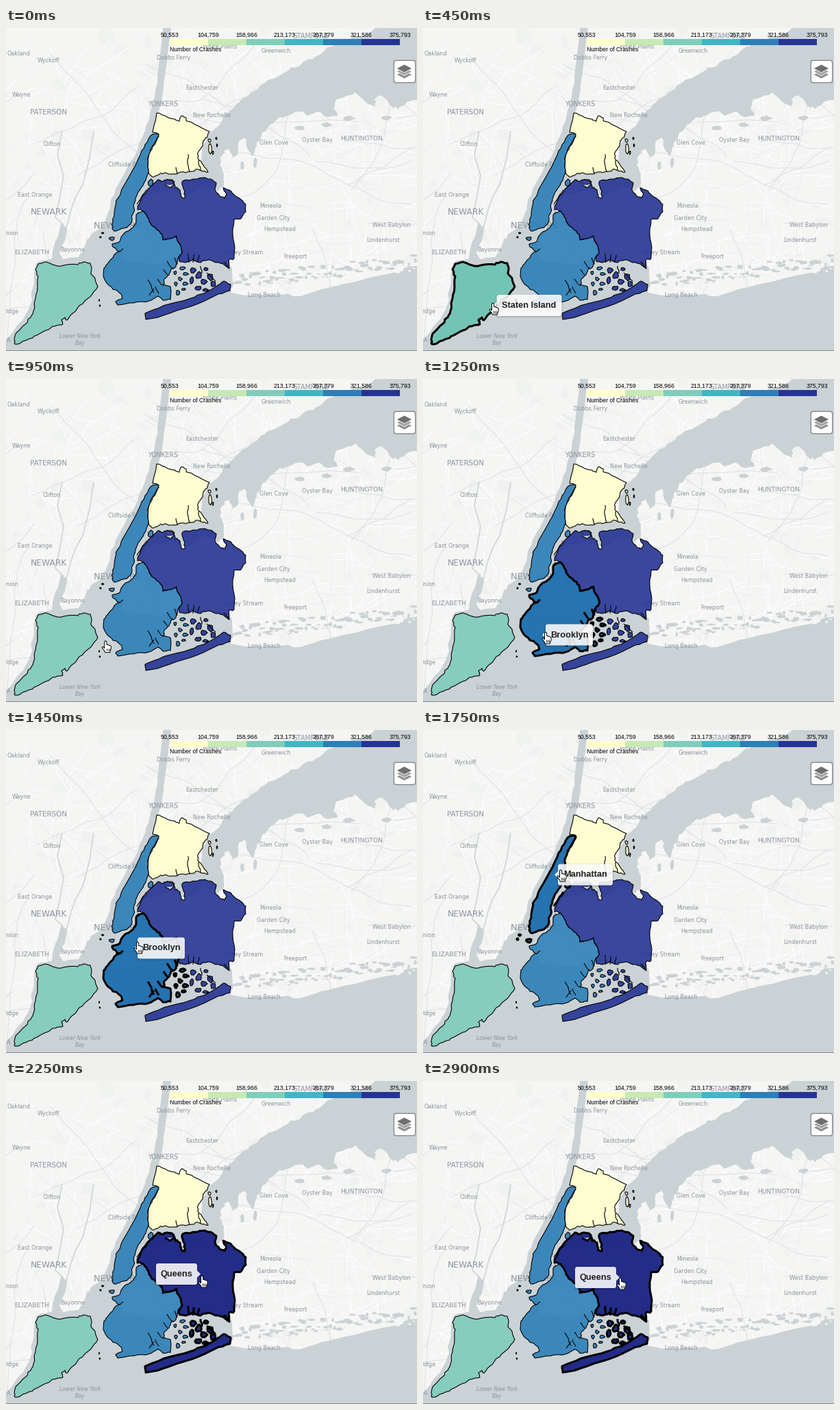
Animation of 600x471 px, one loop 2950 ms. Source, as a matplotlib script:

```python
import numpy as np
import matplotlib.pyplot as plt
from matplotlib.animation import FuncAnimation
from matplotlib.collections import LineCollection
from matplotlib.colors import to_rgba
from matplotlib.patches import FancyBboxPatch, PathPatch, Polygon, Rectangle
from matplotlib.path import Path
from matplotlib.transforms import Affine2D

W, H, DPI = 600, 471, 64
PT = 72 / DPI  # points per pixel
STEP, FRAMES = 50, 59
LAND, WATER, LABEL = "#f5f5f4", "#cbd2d5", "#8b959f"
rng = np.random.default_rng(11)

fig = plt.figure(figsize=(W / DPI, H / DPI), dpi=DPI, facecolor=LAND)
ax = fig.add_axes([0, 0, 1, 1])
ax.set(xlim=(0, W), ylim=(H, 0))
ax.axis("off")


def rough(pts, amp=0.6, n=3, closed=True):
    """Subdivide a polyline and shake the new points a little."""
    pts = np.array(pts, float)
    ends = np.roll(pts, -1, axis=0)
    if not closed:
        pts, ends = pts[:-1], ends[:-1]
    out = []
    for a, b in zip(pts, ends):
        out.append(a)
        for k in range(1, n):
            out.append(a + (b - a) * k / n + rng.normal(0, amp, 2))
    out.append(out[0] if closed else ends[-1])
    return Path(out, closed=closed)


def blob(x, y, rx, ry):
    a = np.linspace(0, 2 * np.pi, 9, endpoint=False)
    r = rng.uniform(0.7, 1.2, 9)
    return rough(np.c_[x + rx * r * np.cos(a), y + ry * r * np.sin(a)], 0.2, 2)


def text(x, y, s, px, color=LABEL, font="DejaVu Sans", **kw):
    kw = {"ha": "center", "va": "center", "zorder": 4, **kw}
    return ax.text(x, y, s, fontsize=px * PT, color=color, family=font, **kw)


def rounded(x, y, w, h, r=3, **kw):
    style = f"round,pad=0,rounding_size={r}"
    return ax.add_patch(FancyBboxPatch((x, y), w, h, boxstyle=style, **kw))


# --- base map: roads first, water on top of them ---
def road(x, y, angle, length):
    n = int(length / 8)
    turn = angle + np.cumsum(rng.normal(0, 0.12, n))
    return np.c_[x + 8 * np.cumsum(np.cos(turn)), y + 8 * np.cumsum(np.sin(turn))]


def roads(count, color, lw, lo, hi):
    segs = []
    for _ in range(count):
        x, y = rng.uniform(0, W), rng.uniform(0, 400)
        if x > 310 and y > 120:
            angle = rng.choice([0.0, -0.12, 1.5])
        else:
            angle = rng.choice([1.9, 1.2, 0.5, 2.5])
        segs.append(road(x, y, angle, rng.uniform(lo, hi)))
    ax.add_collection(LineCollection(segs, colors=color, linewidths=lw * PT, zorder=1))


for _ in range(45):
    park = blob(rng.uniform(0, W), rng.uniform(0, 380), *rng.uniform(4, 15, 2))
    ax.add_patch(PathPatch(park, fc="#f0f2f0", lw=0, zorder=1))
roads(260, "#ffffff", 1.0, 30, 110)
roads(130, "#ebecec", 0.7, 30, 120)
roads(26, "#e2e4e5", 1.3, 120, 320)

HARBOR = [
    (229, -2), (226, 30), (221, 70), (217, 100), (210, 125), (203, 150),
    (192, 178), (175, 208), (160, 235), (152, 258), (147, 275), (138, 290),
    (128, 298), (118, 308), (114, 322), (106, 334), (85, 337), (60, 338),
    (46, 341), (41, 355), (39, 380), (35, 405), (25, 425), (12, 440),
    (4, 450), (-2, 455), (-2, 475), (602, 475), (602, 346), (560, 358),
    (510, 370), (460, 381), (430, 391), (400, 389), (350, 390), (328, 386),
    (331, 372), (330, 350), (322, 340), (250, 334), (228, 345), (170, 340),
    (165, 310), (192, 285), (200, 250), (212, 225), (214, 180), (222, 155),
    (215, 152), (222, 125), (228, 100), (232, 70), (237, 30), (241, -2)]
SOUND = [
    (206, 212), (240, 208), (285, 200), (286, 172), (298, 152), (310, 143),
    (318, 128), (332, 117), (345, 103), (362, 92), (378, 80), (395, 72),
    (412, 62), (428, 56), (440, 46), (456, 40), (470, 28), (490, 24),
    (505, 14), (525, 10), (540, -2), (602, -2), (602, 105), (585, 108),
    (572, 118), (560, 112), (548, 98), (538, 104), (540, 115), (525, 108),
    (510, 94), (495, 100), (482, 104), (478, 118), (484, 128), (470, 130),
    (455, 122), (440, 128), (428, 122), (410, 128), (395, 134), (382, 146),
    (372, 160), (366, 172), (360, 188), (352, 175), (348, 160), (340, 165),
    (338, 185), (331, 190), (325, 176), (316, 185), (312, 200), (318, 212),
    (317, 232), (308, 238), (290, 228), (262, 246), (240, 235), (205, 245),
    (192, 262)]
NEWARK_BAY = [(80, 285), (89, 291), (86, 310), (78, 328), (84, 338),
              (66, 339), (70, 318), (77, 300)]
bays = [rough(HARBOR, 0.8), rough(SOUND, 1.3), rough(NEWARK_BAY)]
for x, y, rx, ry in [(430, 146, 8, 4), (500, 132, 9, 4), (468, 141, 7, 4),
                     (556, 131, 7, 4), (345, 200, 3, 7), (364, 196, 3, 9)]:
    bays.append(blob(x, y, rx, ry))
for x in np.linspace(335, 598, 75):
    y = 372 - 0.11 * (x - 335) + rng.uniform(-13, 7)
    bays.append(blob(x, y, *rng.uniform((2, 1.2), (7, 3.5))))
ax.add_collection(LineCollection(
    [[(88, 292), (95, 265), (101, 248), (112, 228), (122, 190), (128, 150)],
     [(84, 287), (72, 276), (78, 250), (84, 215), (75, 185), (82, 150)]],
    colors=WATER, linewidths=1.5 * PT, zorder=2))
for path in bays:
    ax.add_patch(PathPatch(path, fc=WATER, lw=0, zorder=2))
for x in np.linspace(336, 595, 45):
    y = 381 - 0.12 * (x - 336) + rng.uniform(-7, 4)
    isle = blob(x, y, *rng.uniform((1.5, 0.8), (5, 2)))
    ax.add_patch(PathPatch(isle, fc=LAND, lw=0, zorder=2))

TOWNS = [
    ("Oakland", 18, 37), ("Wyckoff", 62, 48), ("Dobbs Ferry", 245, 44),
    ("White Plains", 312, 28), ("Greenwich", 394, 34), ("Wayne", 22, 97),
    ("Clifton", 67, 170), ("Eastchester", 286, 87), ("New Rochelle", 300, 128),
    ("Cliffside Park", 175, 200), ("Glen Cove", 391, 167),
    ("Oyster Bay", 454, 164), ("East Orange", 42, 244), ("Mineola", 386, 259),
    ("Garden City", 390, 277), ("Hempstead", 400, 294),
    ("West Babylon", 563, 288), ("Lindenhurst", 551, 310),
    ("Freeport", 422, 333), ("Valley Stream", 347, 328),
    ("Long Beach", 377, 389), ("Bayonne", 97, 324), ("Union", 6, 300),
    ("ridge", 8, 413), ("A", 4, 455)]
CITIES = [
    ("STAMFORD", 446, 12, 9.5), ("PATERSON", 62, 123, 10.2),
    ("YONKERS", 229, 111, 9.5), ("HUNTINGTON", 519, 162, 9.3),
    ("NEWARK", 62, 269, 12.2), ("NEW YORK", 163, 288, 13),
    ("ELIZABETH", 38, 327, 9.4)]
for name, x, y in TOWNS:
    text(x, y, name, 8.1)
for name, x, y, px in CITIES:
    text(x, y, name, px)
text(108, 449, "Lower New York", 7.6, style="italic")
text(108, 459, "Bay", 7.6, style="italic")

# --- boroughs ---
STATEN = [
    (47, 344), (58, 341), (66, 344), (75, 347), (90, 345), (105, 345),
    (113, 341), (123, 343), (125, 350), (124, 358), (130, 365), (134, 377),
    (126, 388), (115, 398), (104, 409), (95, 418), (89, 426), (86, 422),
    (81, 426), (83, 432), (78, 433), (68, 435), (58, 441), (45, 448),
    (35, 453), (27, 456), (20, 460), (13, 461), (12, 455), (14, 446),
    (20, 440), (28, 432), (36, 422), (40, 413), (43, 395), (46, 378),
    (47, 362), (43, 352)]
BROOKLYN = [
    (193, 269), (200, 267), (205, 272), (209, 282), (216, 290), (222, 295),
    (228, 301), (229, 309), (240, 307), (249, 303), (250, 310), (255, 317),
    (257, 328), (252, 334), (250, 343), (246, 350), (241, 352), (238, 360),
    (231, 366), (230, 374), (240, 377), (240, 396), (229, 397), (222, 391),
    (212, 397), (198, 399), (180, 401), (163, 404), (160, 399), (170, 394),
    (168, 388), (156, 381), (147, 372), (142, 362), (143, 350), (148, 344),
    (156, 335), (165, 326), (157, 320), (155, 315), (165, 312), (168, 305),
    (175, 297), (185, 291), (190, 283), (190, 273)]
MANHATTAN = [
    (218, 154), (223, 155), (221, 160), (214, 172), (208, 186), (207, 198),
    (208, 210), (204, 222), (198, 232), (191, 244), (187, 256), (186, 270),
    (183, 284), (176, 291), (166, 294), (158, 296), (155, 292), (156, 283),
    (158, 270), (160, 258), (162, 250), (172, 230), (185, 207), (196, 185),
    (203, 170), (211, 157)]
BRONX = [
    (220, 124), (232, 128), (247, 133), (253, 136), (256, 128), (263, 131),
    (265, 136), (281, 143), (297, 151), (293, 160), (288, 164), (287, 172),
    (281, 180), (280, 190), (286, 197), (295, 210), (287, 209), (280, 206),
    (272, 209), (262, 211), (255, 210), (247, 213), (240, 213), (232, 211),
    (224, 213), (216, 217), (210, 214), (207, 204), (208, 188), (214, 173),
    (222, 159), (223, 155), (214, 152)]
QUEENS = [
    (192, 265), (196, 252), (200, 244), (207, 235), (213, 230), (222, 221),
    (229, 224), (235, 221), (243, 223), (247, 233), (254, 236), (256, 247),
    (261, 248), (261, 238), (257, 228), (258, 223), (268, 222), (280, 220),
    (290, 218), (302, 222), (307, 226), (305, 236), (312, 245), (319, 248),
    (322, 243), (317, 233), (325, 236), (333, 243), (343, 250), (350, 257),
    (350, 268), (343, 278), (333, 279), (331, 300), (334, 320), (333, 336),
    (325, 339), (326, 351), (317, 344), (306, 342), (296, 338), (284, 342),
    (272, 338), (262, 342), (254, 341), (252, 334), (257, 328), (255, 317),
    (250, 310), (249, 303), (240, 307), (229, 309), (228, 301), (222, 295),
    (216, 290), (209, 282), (205, 272), (201, 267)]
ROCKAWAY = [
    (203, 416), (204, 425), (230, 419), (260, 409), (290, 398), (310, 388),
    (327, 383), (328, 374), (318, 369), (309, 375), (300, 381), (285, 388),
    (270, 394), (240, 402), (215, 411)]

ISLES = {
    "Staten Island": [(136, 397, 0.6, 1), (137, 405, 0.7, 1)],
    "Brooklyn": [
        (258, 350, 4, 2.5), (262, 359, 4, 2), (254, 366, 3, 3),
        (262, 373, 4, 2.5), (251, 386, 3, 3.5), (247, 357, 2, 3),
        (259, 381, 3, 1.5), (248, 373, 2, 3)],
    "Manhattan": [
        (141, 299, 1.5, 1), (138, 305, 1, 1), (155, 307, 4, 2.5),
        (211, 226, 4, 5)],
    "Bronx": [
        (239, 224, 8, 4), (298, 176, 2, 7), (302, 182, 1, 3),
        (307, 161, 1, 1.5), (297, 164, 2, 3), (308, 171, 0.8, 2)],
    "Queens": [
        (273, 353, 4, 4), (271, 368, 3, 6), (281, 361, 4, 5),
        (289, 370, 5, 4), (298, 363, 4, 5), (302, 373, 4, 4),
        (280, 379, 5, 3), (292, 352, 4, 2.5), (291, 382, 4, 2)]}
CREEKS = {
    "Brooklyn": [
        [(207, 367), (212, 375), (216, 386)], [(209, 390), (216, 380)],
        [(221, 366), (226, 373), (230, 376)], [(218, 377), (223, 387)],
        [(230, 352), (236, 360)], [(235, 340), (243, 351)],
        [(246, 335), (250, 345)], [(165, 326), (171, 322)]],
    "Manhattan": [[(205, 236), (198, 246), (191, 257)]],
    "Bronx": [
        [(266, 184), (265, 197), (268, 209)], [(248, 203), (250, 212)],
        [(281, 193), (284, 208)]],
    "Queens": [
        [(266, 328), (267, 342)], [(274, 330), (273, 342)],
        [(282, 331), (280, 341)], [(318, 341), (325, 348)],
        [(232, 229), (240, 233), (245, 228)], [(284, 347), (286, 358)],
        [(293, 357), (306, 369)]]}
SHAPES = {"Bronx": [BRONX], "Staten Island": [STATEN], "Brooklyn": [BROOKLYN],
          "Manhattan": [MANHATTAN], "Queens": [QUEENS, ROCKAWAY]}
FILL = {"Bronx": ("#ffffcc", "#fdfdc4"), "Staten Island": ("#7fcdbb", "#70c5b5"),
        "Brooklyn": ("#2c7fb8", "#2271b1"), "Manhattan": ("#2c7fb8", "#2271b1"),
        "Queens": ("#253494", "#1e2986")}


def borough(name):
    parts = [rough(p) for p in SHAPES[name]]
    parts += [blob(*i) for i in ISLES[name]]
    parts += [rough(c, 0.5, 3, False) for c in CREEKS.get(name, [])]
    path = Path.make_compound_path(*parts)
    return ax.add_patch(PathPatch(path, ec="black", joinstyle="round"))


areas = {name: borough(name) for name in SHAPES}

# --- legend and layer button ---
RAMP = ["#ffffcc", "#c7e9b4", "#7fcdbb", "#41b6c4", "#2c7fb8", "#253494"]
for k, color in enumerate(RAMP):
    ax.add_patch(Rectangle((239 + 56 * k, 16), 56, 8.5, fc=color, lw=0, zorder=8))
for k, value in enumerate(np.linspace(50553, 375793, 7)):
    text(239 + 56 * k, 10.5, f"{int(value):,}", 8.7, "black", "Liberation Sans", zorder=8)
text(239, 31, "Number of Crashes", 8.6, "black", "Liberation Sans", ha="left", zorder=8)

for grow, alpha in [(2, 0.12), (1, 0.25)]:
    rounded(567 - grow, 48 - grow, 30 + 2 * grow, 31 + 2 * grow, 4,
            fc=to_rgba("black", alpha), lw=0, zorder=8)
rounded(567, 48, 30, 31, fc="white", lw=0, zorder=8)
for dy, color in [(9, "#8f8f8f"), (4.5, "#a3a3a3"), (0, "#6f6f6f")]:
    sheet = [(581.5, 53 + dy), (593, 59 + dy), (581.5, 65 + dy), (570, 59 + dy)]
    ax.add_patch(Polygon(sheet, fc=color, ec="white", lw=0.8 * PT, zorder=8))
ax.plot([0, W], [470.3, 470.3], color="#85898b", lw=1 * PT, zorder=8)

# --- tooltip ---
TIP_WIDTH = {"Staten Island": 95, "Brooklyn": 69, "Manhattan": 80,
             "Bronx": 52, "Queens": 60}
TIP_H = 31
shadows = [rounded(0, 0, 1, 1, 4, fc=to_rgba("black", a), lw=0, zorder=20)
           for a in (0.05, 0.08)]
tip_box = rounded(0, 0, 1, 1, fc=to_rgba("white", 0.88), lw=0, zorder=21)
tip_arrow = ax.add_patch(Polygon([(0, 0)] * 3, fc=to_rgba("white", 0.88), lw=0, zorder=21))
tip_text = text(0, 0, "", 12.8, "#222222", "Liberation Sans", weight="bold", zorder=22)

# --- pointing hand, fingertip at the origin ---
HAND = [(-1.5, 0), (0, -1), (1.5, 0), (1.8, 4.6), (3.6, 4.6), (4.6, 5.6),
        (6.4, 5.6), (8, 7), (8.2, 10), (7, 13.5), (6.5, 16), (-0.5, 16),
        (-2, 13), (-5, 9.3), (-4.5, 7.8), (-3, 8), (-1.5, 9.8)]
place = Affine2D()
hand_tf = place + ax.transData
hand = [ax.add_patch(Polygon(HAND, fc="white", ec="black", lw=1 * PT,
                             joinstyle="round", transform=hand_tf, zorder=30))]
hand.append(ax.add_collection(LineCollection(
    [[(x, 10), (x, 13.5)] for x in (1.3, 3.3, 5.3)], colors="black",
    linewidths=0.8 * PT, transform=hand_tf, zorder=31), autolim=False))

# --- motion: (ms, x, y) ---
POINTER = np.array([
    (50, 72, 416), (250, 90, 410), (450, 102, 402), (850, 134, 387),
    (1250, 179, 370), (1450, 192, 310), (1600, 186, 256), (1750, 201, 205),
    (1950, 240, 180), (2100, 264, 235), (2250, 286, 285), (2900, 288, 288)])
TOOLTIP = np.array([
    (50, 76, 420), (250, 95, 412), (450, 107.5, 404.5), (850, 123, 390),
    (1250, 179, 373), (1450, 192, 318), (1600, 186, 264), (1750, 197, 211),
    (1950, 240, 186), (2100, 256, 235), (2250, 279, 281.5), (2900, 282, 286.5)])
HOVER = [(0, None), (100, "Staten Island"), (900, None), (1000, "Brooklyn"),
         (1600, "Manhattan"), (1850, "Bronx"), (2050, None), (2100, "Queens")]


def at(track, t):
    return [np.interp(t, track[:, 0], track[:, k]) for k in (1, 2)]


def show_tip(name, x, cy):
    on = name is not None
    for part in (*shadows, tip_box, tip_arrow, tip_text):
        part.set_visible(on)
    if not on:
        return
    w, y = TIP_WIDTH[name], cy - TIP_H / 2
    side = 1 if name == "Queens" else -1  # which edge faces the pointer
    left = x - w if side > 0 else x
    tip_box.set_bounds(left, y, w, TIP_H)
    for grow, part in zip((2, 1), shadows):
        part.set_bounds(left - grow, y - grow + 1, w + 2 * grow, TIP_H + 2 * grow)
    tip_arrow.set_xy([(x, cy - 5), (x + 5 * side, cy), (x, cy + 5)])
    tip_text.set_position((left + w / 2, cy + 0.5))
    tip_text.set_text(name)


def update(i):
    t = i * STEP
    active = [name for start, name in HOVER if start <= t][-1]
    for name, area in areas.items():
        on = name == active
        area.set_facecolor(to_rgba(FILL[name][on], 0.98 if on else 0.9))
        area.set_linewidth((3 if on else 1.1) * PT)
        area.set_zorder(6 if on else 5)
    show_tip(active, *at(TOOLTIP, t))
    place.clear().translate(*at(POINTER, t))
    for part in hand:
        part.set_visible(t >= 50)


anim = FuncAnimation(fig, update, frames=FRAMES, interval=STEP,
                     init_func=lambda: update(0), repeat=True, repeat_delay=0)
plt.show()
```
